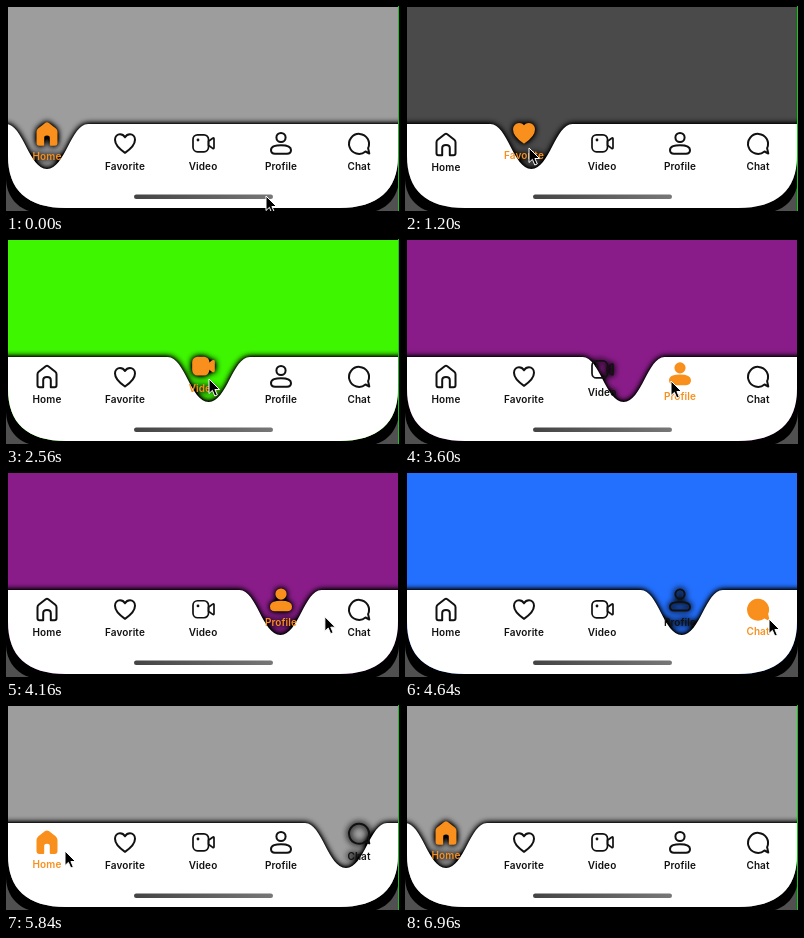
An HTML page that plays this animation: 393 by 205 pixels, repeating every 7760 ms.

```html
<!DOCTYPE html>
<html lang="en">
<head>
<meta charset="utf-8">
<title>Curved tab bar</title>
<style>
  html, body { margin: 0; width: 100%; height: 100%; overflow: hidden; background: #000; }
  svg { display: block; width: 100%; height: 100%; }
  text { font: 600 10px Inter, Roboto, sans-serif; letter-spacing: .1px; text-anchor: middle; stroke: none; }
  .icon { stroke-width: 2; stroke-linejoin: round; stroke-linecap: round; fill: none; stroke: currentColor; }
  .thin { stroke-width: 1.700; }
  .on .icon { fill: currentColor; }
  .dot { fill: currentColor; stroke: none; }
  .on .dot { fill: none; }
  .tab { color: #111; fill: currentColor; }
  .tab.on { color: #f98f1c; }
</style>
</head>
<body>
<svg viewBox="0 0 393 205">
  <defs>
    <clipPath id="screen">
      <path d="M2 1V150C2 184 21 202 60 202H333C372 202 392 184 392 150V1Z"/>
    </clipPath>
    <linearGradient id="grip">
      <stop stop-color="#444"/><stop offset="1" stop-color="#777"/>
    </linearGradient>
    <filter id="shade" filterUnits="userSpaceOnUse" x="-30" y="80" width="453" height="150" color-interpolation-filters="sRGB">
      <feGaussianBlur in="SourceAlpha" stdDeviation="3"/>
      <feComponentTransfer result="glow">
        <feFuncR type="linear" slope="0"/>
        <feFuncG type="linear" slope="0"/>
        <feFuncB type="linear" slope="0"/>
        <feFuncA type="linear" slope="1.900"/>
      </feComponentTransfer>
      <feMerge><feMergeNode in="glow"/><feMergeNode in="SourceGraphic"/></feMerge>
    </filter>
  </defs>
  <rect width="393" height="205" fill="#505050"/>
  <path d="M0 0V172C0 190 12 204 28 206H365C381 204 393 190 393 172V0Z"/>
  <g clip-path="url(#screen)">
    <rect id="page" width="393" height="205"/>
    <g filter="url(#shade)">
      <path id="bar" fill="#fff"/>
      <g id="tabs"></g>
    </g>
    <rect x="128" y="188.500" width="139" height="4.400" rx="2.200" fill="url(#grip)"/>
  </g>
  <path id="edge" d="M392.500 0V205" stroke="#17c41a"/>
  <path id="cursor" d="M0 0V14.500L3.400 11.400L5.800 17L8.300 15.900L5.900 10.500H10.500Z" fill="#000" stroke="#fff"/>
</svg>
<script>
const LOOP = 7760, STEP = 80, END = 6960;
const TOP = 118, DEPTH = 45, LIFT = 9.5;
const OMEGA = 2 * Math.PI / 0.45, DAMPING = 0.6;
const $ = id => document.getElementById(id);

const tabs = [
  { name: 'Home', page: '#9d9d9d',
    icon: '<path class="icon" d="M-7.500 10.500Q-9.500 10.500 -9.500 8.500V-2.500Q-9.500 -4 -8.300 -5L-1.300 -10.500Q0 -11.400 1.300 -10.500L8.300 -5Q9.500 -4 9.500 -2.500V8.500Q9.500 10.500 7.500 10.500H3.800V3.500Q3.800 .3 0 .3T-3.800 3.500V10.500Z"/>' },
  { name: 'Favorite', page: '#4a4a4a',
    icon: '<path class="icon" d="M0 9C-4 6.300 -10 1.500 -10 -4C-10 -7.500 -7.500 -9.500 -5 -9.500C-2.500 -9.500 -1 -8.200 0 -6.500C1 -8.200 2.500 -9.500 5 -9.500C7.500 -9.500 10 -7.500 10 -4C10 1.500 4 6.300 0 9Z"/>' },
  { name: 'Video', page: '#3df600',
    icon: '<rect class="icon thin" x="-10" y="-9" width="15.500" height="17" rx="4.500"/><path class="icon thin" d="M5.500 -2.500L9.700 -5.600Q11 -6.300 11 -5V4Q11 5.300 9.700 4.600L5.500 1.500Z"/><circle class="dot" cx="-5" cy="-3.800" r="1.400"/>' },
  { name: 'Profile', page: '#8a1c8a',
    icon: '<circle class="icon" cy="-6.300" r="4.600"/><path class="icon" d="M-10 6.200C-10 2.200 -5 1.400 0 1.400S10 2.200 10 6.200C10 9.200 8 10 6 10H-6C-8 10 -10 9.200 -10 6.200Z"/>' },
  { name: 'Chat', page: '#2370ff',
    icon: '<path class="icon" d="M10.300 9.700L6.500 7.700A10 10 0 1 1 9.100 4.300Z"/>' }
];
const taps = [[919, 1], [2322, 2], [3535, 3], [4624, 4], [5818, 0]];
const pointer = [
  [0, 260, 190], [680, 124, 142], [1560, 124, 142], [2180, 203, 140],
  [2760, 203, 140], [3440, 266, 142], [3760, 266, 142], [4520, 364, 147],
  [4800, 364, 147], [5600, 59, 146], [6000, 59, 146], [6560, 110, -20]
];

const tabX = i => 41 + 78 * i;
const mix = (a, b, k) => a + (b - a) * k;

$('tabs').innerHTML = tabs.map(t =>
  `<g class="tab"><g transform="translate(0 137.800)">${t.icon}</g><text y="163.700">${t.name}</text></g>`).join('');
const nodes = [...$('tabs').children];

function spring(ms) {
  const w = OMEGA * ms / 1000, d = Math.sqrt(1 - DAMPING ** 2);
  return 1 - Math.exp(-DAMPING * w) * (Math.cos(d * w) + DAMPING / d * Math.sin(d * w));
}

function barPath(x) {
  const low = TOP + DEPTH;
  return `M-40 ${TOP}H${x - 41}C${x - 24} ${TOP} ${x - 18} ${low} ${x} ${low}` +
    `C${x + 18} ${low} ${x + 24} ${TOP} ${x + 41} ${TOP}H433V245H-40Z`;
}

function pointerAt(t) {
  const n = pointer.findIndex(p => p[0] > t);
  if (n < 0) return pointer[pointer.length - 1].slice(1);
  const [t0, x0, y0] = pointer[n - 1], [t1, x1, y1] = pointer[n];
  const u = (t - t0) / (t1 - t0), k = u * u * (3 - 2 * u);
  return [mix(x0, x1, k), mix(y0, y1, k)];
}

function draw(t) {
  let from = 0, to = 0, k = 1;
  for (const [at, tab] of taps) {
    if (t >= at) { from = to; to = tab; k = spring(t - at); }
  }
  $('page').setAttribute('fill', tabs[to].page);
  $('bar').setAttribute('d', barPath(mix(tabX(from), tabX(to), k)));
  nodes.forEach((node, i) => {
    const lift = i === to ? (from === to ? 1 : k) : i === from ? 1 - k : 0;
    node.setAttribute('transform', `translate(${tabX(i)} ${-LIFT * lift})`);
    node.classList.toggle('on', i === to);
  });
  $('edge').style.display = to < 3 ? '' : 'none';
  $('cursor').setAttribute('transform', `translate(${pointerAt(t)})`);
}

const start = performance.now();
function tick() {
  const t = (performance.now() - start) % LOOP;
  draw(Math.min(END, Math.floor(t / STEP) * STEP));
  requestAnimationFrame(tick);
}
tick();
</script>
</body>
</html>
```
